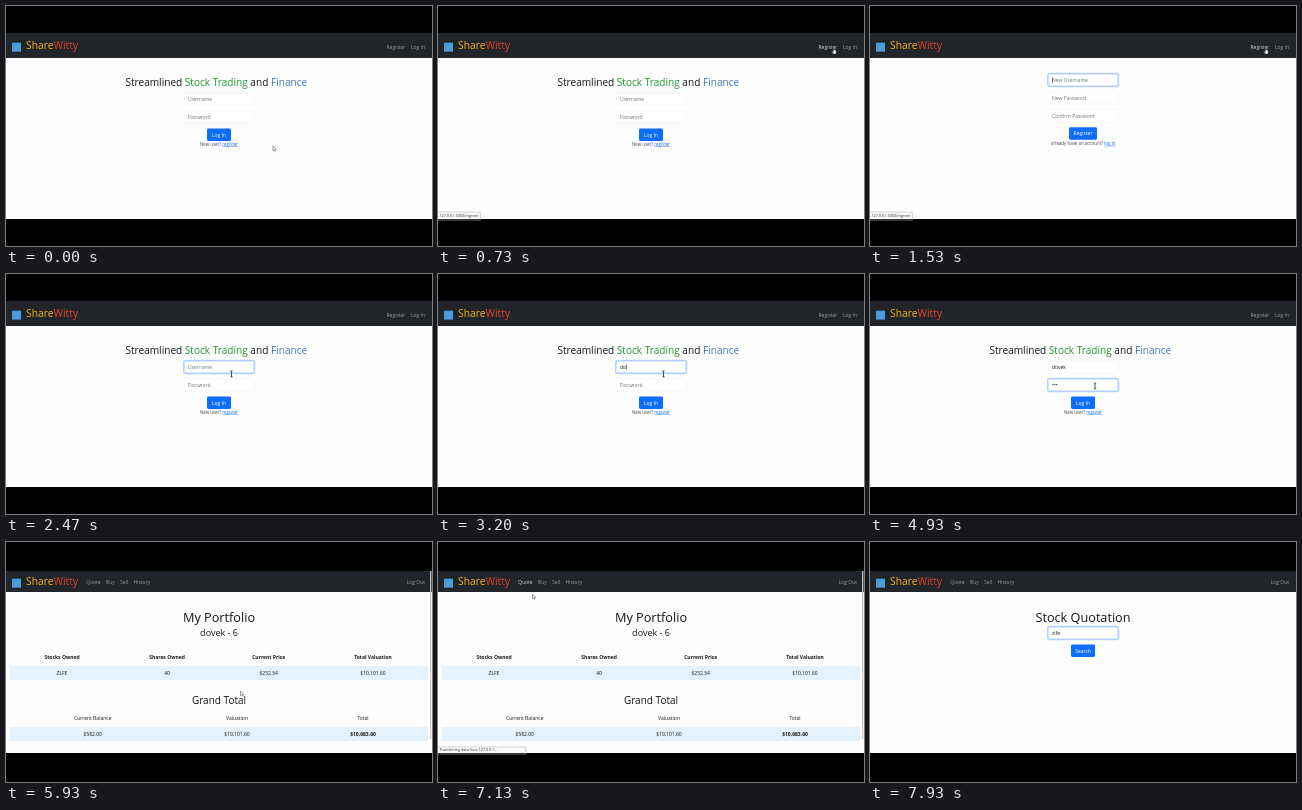
Recreate the animation shown at these times as an HTML page with a canvas. Size 426 px wide and 240 px high, loop 8 s.

```html
<!DOCTYPE html>
<html lang="en">
<head>
<meta charset="utf-8">
<title>ShareWitty</title>
<style>
  html, body { margin: 0; width: 100%; height: 100%; overflow: hidden; background: #000; }
  canvas { display: block; width: 100vw; height: 100vh; }
</style>
</head>
<body>
<canvas id="stage"></canvas>
<script>
const W = 426, H = 240, LOOP = 8000, BLINK = 530;
const canvas = document.getElementById('stage');
const ctx = canvas.getContext('2d');
const FONT = '"Open Sans", "Noto Sans", sans-serif';
const NAV = '#212529', INK = '#14171a', GREY = '#6c757d', BLUE = '#0d6efd', PAPER = '#fdfdfd', STRIPE = '#e3f2fd';
const USER = 'dovek', TICKER = 'ZLFE';

// Page switches and typing spans, in ms
const T = {
  register: 1030, login: 1930, name: [2950, 3750],
  password: 4330, secret: [4500, 5200], portfolio: 5530,
  wait: 6930, quote: 7270, symbol: [7470, 7860]
};

// Pointer stops: time, x, y
const PATH = [
  [0, 267, 140], [150, 267, 140], [720, 396, 42], [1560, 396, 42],
  [1780, 412, 41], [1960, 412, 41], [2350, 225.5, 100], [3300, 225.5, 100],
  [3800, 225, 120], [4080, 225, 120], [4260, 225, 112], [5000, 225, 112],
  [5750, 234.5, 149], [6150, 234.5, 149], [6800, 89, 40], [6950, 89, 40],
  [7120, 94.5, 52], [8000, 94.5, 52]
];

const ease = p => p * p * (3 - 2 * p);

function pointerAt(t) {
  let i = 0;
  while (i < PATH.length - 2 && t >= PATH[i + 1][0]) i++;
  const [t0, x0, y0] = PATH[i], [t1, x1, y1] = PATH[i + 1];
  const p = ease((t - t0) / (t1 - t0));
  return [x0 + (x1 - x0) * p, y0 + (y1 - y0) * p];
}

function typed(word, [from, to], t) {
  const p = (t - from) / (to - from);
  return p < 0 ? '' : word.slice(0, 1 + Math.floor(p * (word.length - 1)));
}

function rect(x, y, w, h, color) {
  ctx.fillStyle = color;
  ctx.fillRect(x, y, w, h);
}

function roundRect(x, y, w, h, r, fill, stroke, line = 0.6) {
  ctx.beginPath();
  ctx.roundRect(x, y, w, h, r);
  if (fill) { ctx.fillStyle = fill; ctx.fill(); }
  if (stroke) { ctx.strokeStyle = stroke; ctx.lineWidth = line; ctx.stroke(); }
}

// y is the middle of the capitals; returns the right edge
function text(str, x, y, size = 5, color = INK, align = 'left', weight = 400) {
  ctx.font = `${weight} ${size}px ${FONT}`;
  ctx.textAlign = align;
  ctx.fillStyle = color;
  ctx.fillText(str, x, y + size * 0.36);
  return x + ctx.measureText(str).width;
}

const center = (str, x, y, size, color, weight) => text(str, x, y, size, color, 'center', weight);

// Runs of [string, colour, underlined], centred as one line
function runs(parts, x, y, size) {
  ctx.font = `400 ${size}px ${FONT}`;
  const width = parts.reduce((sum, [s]) => sum + ctx.measureText(s).width, 0);
  let left = x - width / 2;
  for (const [s, color, underline] of parts) {
    const right = text(s, left, y, size, color);
    if (underline) rect(left, y + size * 0.5, right - left, 0.4, color);
    left = right;
  }
}

// focusAge is the time since the field took focus; negative means unfocused
function input(y, hint, value = '', focusAge = -1) {
  const focused = focusAge >= 0;
  if (focused) roundRect(177.6, y - 6.6, 71, 13.2, 2, null, 'rgba(13,110,253,.25)', 1.2);
  roundRect(178.2, y - 6, 69.8, 12, 1.5, '#fff', focused ? '#86b7fe' : '#f0f0f1');
  const end = value ? text(value, 182, y) : 182;
  if (!value) text(hint, 182, y, 5, GREY);
  if (focused && focusAge % (2 * BLINK) < BLINK) rect(end, y - 2.8, 0.5, 5.6, INK);
}

function button(label, y, w) {
  roundRect(213 - w / 2, y - 6.2, w, 12.4, 1.4, BLUE);
  center(label, 213, y, 5, '#fff');
}

function link(x, y, label, lit, align) {
  text(label, x, y, 5, lit ? 'rgba(255,255,255,.8)' : 'rgba(255,255,255,.55)', align);
}

function frame(top, navBottom, bottom) {
  rect(0, 0, W, H, '#000');
  rect(0, navBottom, W, bottom - navBottom, PAPER);
  rect(0, top, W, navBottom - top, NAV);
  const mid = (top + navBottom) / 2;
  rect(6, mid - 2.8, 9, 9, '#4a9bdc');
  const x = text('Share', 20, mid, 10.3, '#f3b323');
  text('Witty', x, mid, 10.3, '#e2432f');
}

function status(label, w, y, bottom) {
  rect(0, y, w, bottom - y, '#f9f9fa');
  ctx.strokeStyle = '#b9b9bd';
  ctx.lineWidth = 0.6;
  ctx.strokeRect(-1, y, w + 1, bottom - y + 1);
  text(label, 1.5, (y + bottom) / 2, 3.65, '#333');
}

function guestFrame(lit) {
  frame(27, 52, 213);
  link(380.5, 41.3, 'Register', lit === 'register');
  link(419, 41.3, 'Log In', lit === 'login', 'right');
}

function userFrame(lit) {
  frame(29, 50, 211);
  link(80, 39.8, 'Quote', lit);
  link(100, 39.8, 'Buy');
  link(114, 39.8, 'Sell');
  link(127.5, 39.8, 'History');
  link(419, 39.8, 'Log Out', false, 'right');
}

function loginPage(t) {
  const back = t >= T.login;
  const onPassword = t >= T.password;
  const overRegister = !back && t > 680;
  guestFrame(overRegister ? 'register' : back && t < 2000 ? 'login' : '');
  runs([['Streamlined ', INK], ['Stock Trading', '#219a30'], [' and ', INK], ['Finance', '#4179c6']], 210.3, 76.3, 10.08);
  input(93, 'Username', typed(USER, T.name, t), onPassword ? -1 : t - T.login);
  input(111, 'Password', typed('•••••', T.secret, t), t - T.password);
  button('Log In', 128.7, 24);
  runs([['New user? ', '#4a4e53'], ['register', BLUE, true]], 213, 138.3, 4.4);
  if (overRegister) status('127.0.0.1:5000/register', 42.5, 206, 213);
}

function registerPage(t) {
  const onLogin = t > 1740;
  guestFrame(onLogin ? 'login' : 'register');
  input(74, 'New Username', '', t - T.register);
  input(92, 'New Password');
  input(110, 'Confirm Password');
  button('Register', 127.5, 28);
  runs([['already have an account? ', '#4a4e53'], ['log in', BLUE, true]], 213.3, 137.6, 4.45);
  status(onLogin ? '127.0.0.1:5000/login' : '127.0.0.1:5000/register', onLogin ? 38 : 42.5, 206, 213);
}

function row(cells, columns, y, weightAt = () => 400) {
  cells.forEach((cell, i) => center(cell, columns[i], y, 5, INK, weightAt(i)));
}

function portfolioPage(t) {
  const overQuote = t > 6760;
  userFrame(overQuote);
  center('My Portfolio', 213, 75, 12.7);
  center(USER + ' - 6', 213, 90.8, 9);
  rect(4, 124, 418, 14, STRIPE);
  rect(4, 185, 418, 14, STRIPE);
  const wide = [56, 161, 262.7, 367], narrow = [86.7, 231, 357];
  row(['Stocks Owned', 'Shares Owned', 'Current Price', 'Total Valuation'], wide, 115, () => 700);
  row([TICKER, '40', '$252.54', '$10,101.60'], wide, 131);
  center('Grand Total', 213, 158.7, 10);
  row(['Current Balance', 'Valuation', 'Total'], narrow, 176);
  row(['$582.00', '$10,101.60', '$10,683.60'], narrow, 191.7, i => i === 2 ? 700 : 400);
  rect(424, 29, 1.3, 168, '#c4c6c9');
  if (t >= T.wait) status('Transferring data from 127.0.0.1…', 88, 205, 211);
  else if (overQuote) status('127.0.0.1:5000/quote', 40, 205, 211);
}

function quotePage(t) {
  userFrame(false);
  center('Stock Quotation', 213, 75, 12.7);
  input(91, 'Symbol', typed(TICKER.toLowerCase(), T.symbol, t), t - T.quote);
  button('Search', 108.8, 24);
}

function polygon(points, x, y) {
  ctx.beginPath();
  points.forEach(([dx, dy]) => ctx.lineTo(x + dx, y + dy));
  ctx.closePath();
  ctx.fillStyle = '#fff';
  ctx.strokeStyle = '#444';
  ctx.lineWidth = 0.5;
  ctx.fill();
  ctx.stroke();
}

const ARROW = [[0, 0], [0, 4.6], [1, 3.7], [1.8, 5.3], [2.5, 5], [1.8, 3.4], [3.2, 3.3]];
const HAND = [[-0.5, 0], [0.3, 0], [0.4, 2], [2, 2.5], [2.2, 4.2], [1.6, 6], [-0.6, 6], [-2, 3.6], [-1.5, 3.2], [-0.5, 4]];

function pointer(t) {
  if (t >= T.symbol[0]) return;
  const [x, y] = pointerAt(t);
  const onLink = (t > 680 && t < 2000) || (t > 6760 && t < 7000);
  const onField = t > 2310 && t < 5150;
  if (onLink) polygon(HAND, x, y);
  else if (onField) {
    rect(x - 0.4, y - 3, 0.8, 6, '#222');
    rect(x - 1.3, y - 3.2, 2.6, 0.6, '#222');
    rect(x - 1.3, y + 2.6, 2.6, 0.6, '#222');
  } else polygon(ARROW, x, y);
}

function draw(now) {
  const t = now % LOOP;
  const ratio = window.devicePixelRatio || 1;
  const w = Math.round(innerWidth * ratio), h = Math.round(innerHeight * ratio);
  if (canvas.width !== w || canvas.height !== h) {
    canvas.width = w;
    canvas.height = h;
  }
  ctx.setTransform(w / W, 0, 0, h / H, 0, 0);
  if (t >= T.quote) quotePage(t);
  else if (t >= T.portfolio) portfolioPage(t);
  else if (t >= T.register && t < T.login) registerPage(t);
  else loginPage(t);
  pointer(t);
}

const start = performance.now();
function tick() {
  draw(performance.now() - start);
  requestAnimationFrame(tick);
}
tick();
</script>
</body>
</html>
```
